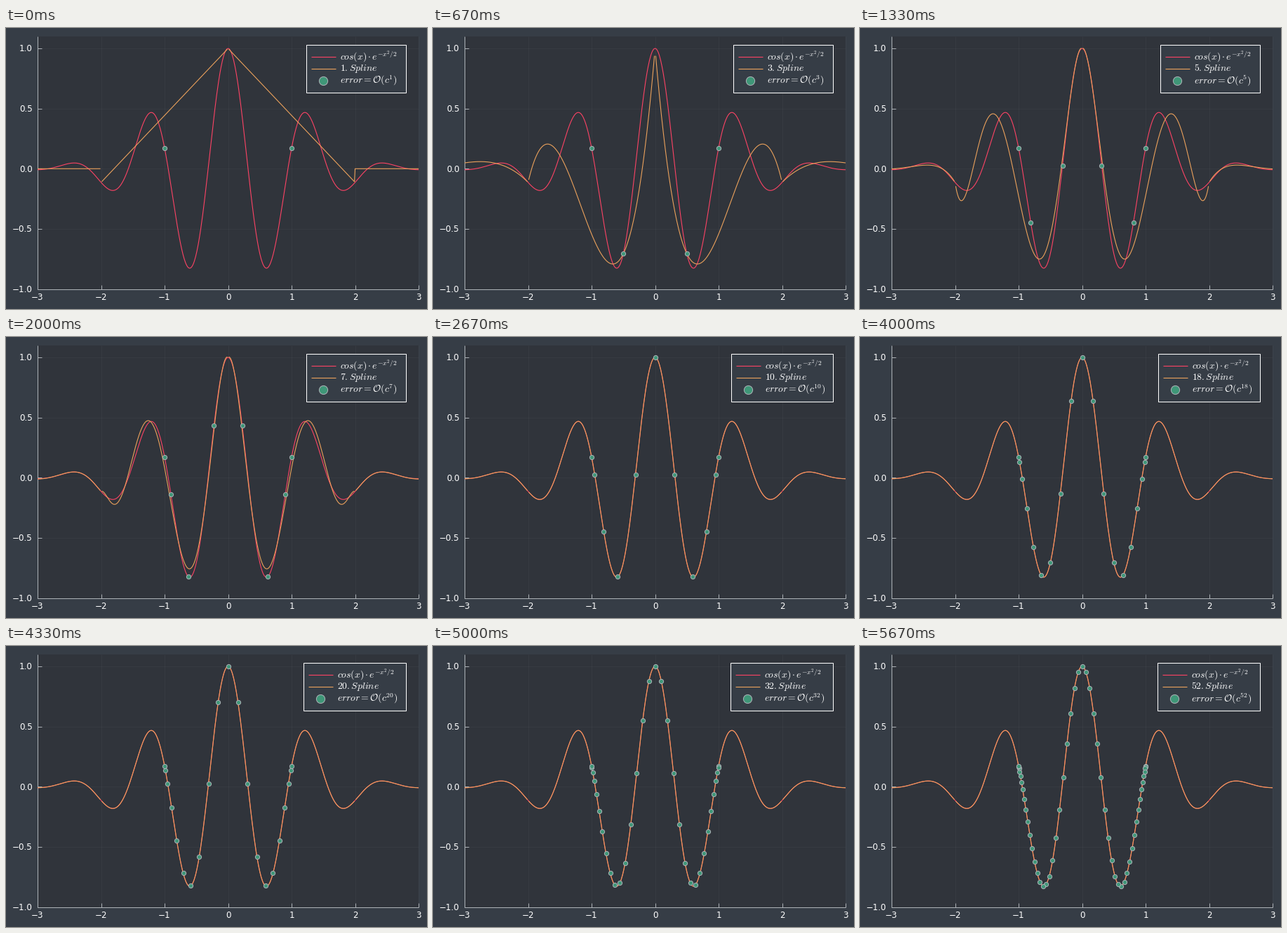
A matplotlib script that plays this animation: 600x400 px, repeating every 6.01 s.

```python
import numpy as np
import matplotlib.pyplot as plt
from matplotlib.animation import FuncAnimation
from matplotlib.patches import Rectangle

W, H, DPI = 600, 400, 100
PX = 72 / DPI  # points per pixel
LOOP, CELLS = 6010, 200
STEP = LOOP / CELLS

BG, INSIDE, FG, WHITE = "#363D46", "#30343B", "#ADB2B7", "#FFFFFF"
RED, ORANGE, GREEN = "#FE4365", "#ECA25C", "#3F9778"
LEFT, RIGHT, TOP, BOTTOM = 45, 588, 12, 371.5

DEGREES = [*range(1, 8), *range(8, 21, 2), *range(22, 53, 10)]
STARTS = [10 * round(k * 100 / 3) for k in range(len(DEGREES))]

plt.rcParams["font.family"] = "DejaVu Sans"
plt.rcParams["mathtext.fontset"] = "cm"


def f(x):
    return np.cos(5 * x) * np.exp(-x**2 / 2)


def px(x):
    return LEFT + (np.asarray(x) + 3) * (RIGHT - LEFT) / 6


def py(y):
    return BOTTOM - (np.asarray(y) + 1) * (BOTTOM - TOP) / 2.1


def nodes(n):
    return np.cos(np.pi * np.arange(n + 1) / n)


def spline(x, n):
    """Barycentric Chebyshev interpolation on pieces of length 2.

    Left piece ends hit a node exactly and come out as NaN, leaving gaps.
    """
    mid = 2 * np.floor(x / 2) + 1
    t = nodes(n)
    w = (-1.0) ** np.arange(n + 1)
    w[[0, -1]] /= 2
    with np.errstate(divide="ignore", invalid="ignore"):
        c = w / ((x - mid)[:, None] - t)
        y = (c * f(mid[:, None] + t)).sum(1) / c.sum(1)
    if n == 1:
        y[(x < -2) | (x >= 2)] = 0
    return y


fig = plt.figure(figsize=(W / DPI, H / DPI), dpi=DPI, facecolor=BG)
ax = fig.add_axes([0, 0, 1, 1])
ax.set(xlim=(0, W), ylim=(H, 0))
ax.axis("off")


def stroke(x, y, color, width=1.0, **kw):
    return ax.plot(x, y, color=color, lw=width * PX, solid_capstyle="butt", **kw)[0]


def dots(x, y, radius, z):
    return ax.plot(x, y, "o", ms=2 * radius * PX, mfc=GREEN, mec=FG,
                   mew=PX, zorder=z)[0]


def label(x, y, s, size, **kw):
    return ax.text(x, y, s, color=WHITE, fontsize=size * PX, va="baseline", **kw)


# Axes
ax.add_patch(Rectangle((LEFT, TOP), RIGHT - LEFT, BOTTOM - TOP, fc=INSIDE, ec="none"))
for v in range(-3, 4):
    x = px(v)
    stroke([x, x], [TOP, BOTTOM], FG, 0.5, alpha=0.1)
    stroke([x, x], [BOTTOM, BOTTOM - 5.5], FG)
    label(x, 387.3, f"{v}".replace("-", "\u2212"), 11.85, ha="center")
for v in np.arange(-1, 1.1, 0.5):
    y = py(v)
    stroke([LEFT, RIGHT], [y, y], FG, 0.5, alpha=0.1)
    stroke([LEFT, LEFT + 5.5], [y, y], FG)
    label(37.8, y + 4.3, f"{v:.1f}".replace("-", "\u2212"), 11.85, ha="right")
stroke([LEFT, LEFT], [TOP, BOTTOM], FG)
stroke([LEFT, RIGHT], [BOTTOM, BOTTOM], FG)

# Curves
grid = np.arange(-300, 301) / 100
stroke(px(grid), py(f(grid)), RED, 1.1, zorder=3)
curve = stroke([], [], ORANGE, 1.1, zorder=4)
points = dots([], [], 3.1, 5)

# Legend
box = Rectangle((428, 24), 142, 68, fc=BG, ec=WHITE, lw=PX, zorder=6)
ax.add_patch(box)
keys = [stroke([], [], c, 1.1, zorder=7) for c in (RED, ORANGE)]
key_dot = dots([], [], 6.1, 7)
texts = [label(0, y, "", 13.7, zorder=7) for y in (45.6, 61.2, 79)]


def update(i):
    n = DEGREES[np.searchsorted(STARTS, (i + 1) * STEP) - 1]
    curve.set_data(px(grid), py(spline(grid, n)))
    points.set_data(px(nodes(n)), py(f(nodes(n))))

    x0 = 428 if n < 10 else 425 if n < 20 else 424
    box.set_x(x0)
    box.set_width(570 - x0)
    for key, y in zip(keys, (41, 58)):
        key.set_data([x0 + 6.5, x0 + 42], [y, y])
    key_dot.set_data([x0 + 24.2], [75])
    rows = (r"$cos(x) \cdot e^{-x^2/2}$",
            rf"${n}. Spline$",
            rf"$error = \mathcal{{O}}(c^{{{n}}})$")
    for text, s in zip(texts, rows):
        text.set_x(x0 + 47.7)
        text.set_text(s)
    return curve, points, box, *keys, key_dot, *texts


anim = FuncAnimation(fig, update, frames=CELLS, interval=STEP, repeat=True,
                     repeat_delay=0, blit=False)
plt.show()
```
